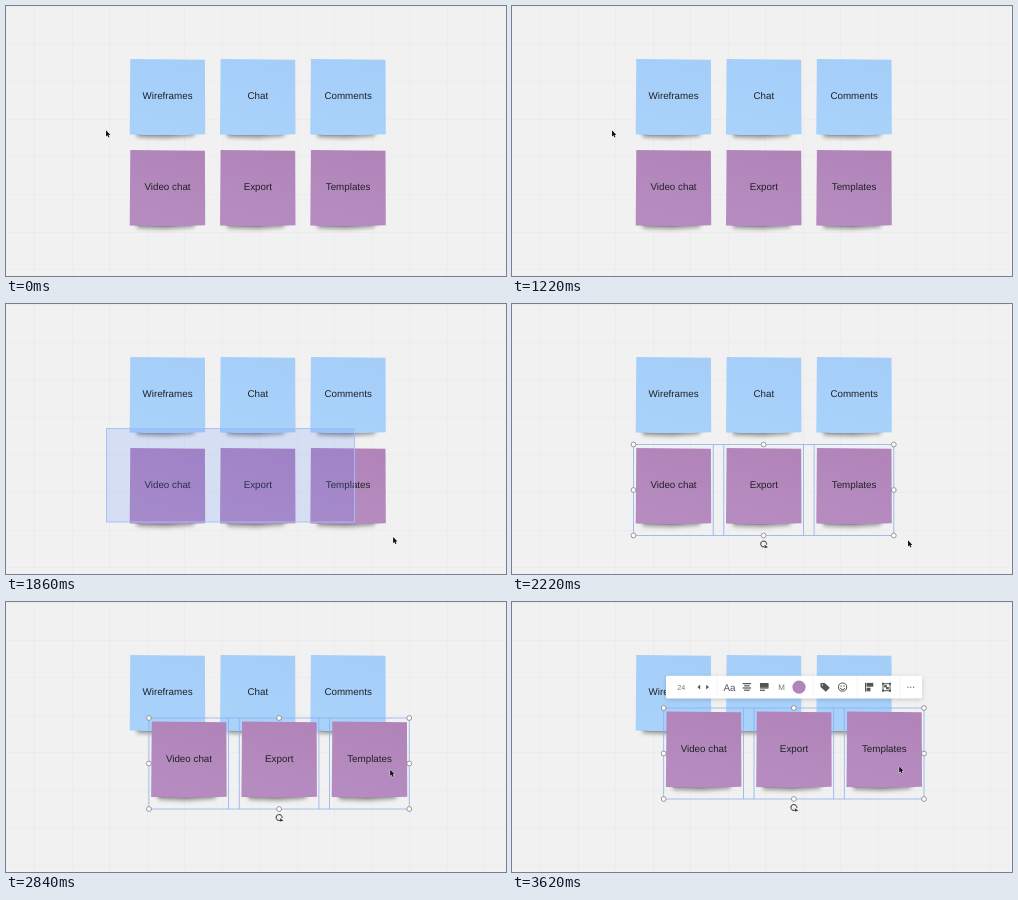
Recreate the animation shown at these times as an HTML page with a canvas. Size 500 by 270 pixels, loop 3.64 s.

```html
<!DOCTYPE html>
<html lang="en">
<head>
<meta charset="utf-8">
<title>Hold shift to select</title>
<style>
html, body { margin: 0; width: 100%; height: 100%; overflow: hidden; background: #f1f1f1; }
canvas { display: block; width: 100vw; height: 100vh; }
</style>
</head>
<body>
<canvas id="stage" width="500" height="270"></canvas>
<script>
const ctx = document.getElementById('stage').getContext('2d');
const LOOP = 3640;
const CARD_IN = 600, CARD_OUT = 1220;
const SWEEP = 1395, LAG = 78, RELEASE = 2060;
const GRAB = 2680, LEAD = 40;
const BAR_IN = 2290, BAR_OUT = 2700, BAR_BACK = 3440;
const FONT = '"Liberation Sans", Arial, sans-serif';
const PITCH = 90.3, NOTE = 75;
const BOX = { left: 121.5, top: 140.5, width: 79.7, height: 91, right: 381.8 };
const ICON = '#555';

function ease(t, from, length) {
  const p = Math.min(1, Math.max(0, (t - from) / length));
  return p * p * (3 - 2 * p);
}

function dragAt(t) {
  const p = ease(t, GRAB, 250);
  return [30.2 * p, -34.5 * p];
}

function cursorAt(t) {
  const out = ease(t, SWEEP, 520);
  const back = ease(t, 2300, 350);
  const [dx, dy] = dragAt(t + LEAD);
  return [100 + 296 * out - 39 * back + dx, 124 + 112 * out - 37.5 * back + dy];
}

function rect(x, y, w, h, color) {
  ctx.fillStyle = color;
  ctx.fillRect(x, y, w, h);
}

function poly(points, fill) {
  ctx.beginPath();
  points.forEach(([x, y]) => ctx.lineTo(x, y));
  ctx.closePath();
  ctx.fillStyle = fill;
  ctx.fill();
}

function arc(x, y, r, from, to, color, width = 1) {
  ctx.beginPath();
  ctx.arc(x, y, r, from, to);
  ctx.strokeStyle = color;
  ctx.lineWidth = width;
  ctx.stroke();
}

function disc(x, y, r, fill) {
  ctx.beginPath();
  ctx.arc(x, y, r, 0, Math.PI * 2);
  ctx.fillStyle = fill;
  ctx.fill();
}

function panel(x, y, w, h, r, fill) {
  ctx.beginPath();
  ctx.roundRect(x, y, w, h, r);
  ctx.fillStyle = fill;
  ctx.fill();
}

function shadow(alpha, blur, dy) {
  ctx.shadowColor = `rgba(0,0,0,${alpha})`;
  ctx.shadowBlur = blur;
  ctx.shadowOffsetY = dy;
}

function text(str, x, y, size, color, weight = 400) {
  ctx.font = `${weight} ${size}px ${FONT}`;
  ctx.textRendering = 'geometricPrecision';
  ctx.textAlign = 'center';
  ctx.fillStyle = color;
  ctx.fillText(str, x, y);
}

function board() {
  rect(0, 0, 500, 270, '#f1f1f1');
  for (let i = 0; i < 13; i++) rect(Math.round(28 + i * 37.5), 0, 1, 270, '#ececec');
  for (let i = 0; i < 8; i++) rect(0, Math.round(i * 37.6), 500, 1, '#ececec');
}

function note(label, top, bottom) {
  ctx.save();
  shadow(0.4, 4, 2);
  poly([[7, 60], [66, 60], [64, 75], [36, 77], [7, 76]], '#888');
  ctx.restore();

  const paint = ctx.createLinearGradient(NOTE, 0, NOTE * 0.7, NOTE);
  paint.addColorStop(0, top);
  paint.addColorStop(1, bottom);
  ctx.beginPath();
  ctx.moveTo(0.4, 0);
  ctx.lineTo(NOTE, 0.8);
  ctx.lineTo(NOTE + 0.3, NOTE + 0.3);
  ctx.quadraticCurveTo(NOTE / 2, NOTE + 2, -0.2, NOTE + 0.7);
  ctx.closePath();
  ctx.fillStyle = paint;
  ctx.fill();
  text(label, NOTE / 2 + 0.1, 40.1, 9.8, '#202127');
}

function row(y, labels, top, bottom) {
  labels.forEach((label, i) => {
    ctx.save();
    ctx.translate(123.9 + i * PITCH, y);
    note(label, top, bottom);
    ctx.restore();
  });
}

function selection() {
  const { left, top, width, height, right } = BOX;
  const middle = (left + right) / 2;
  ctx.strokeStyle = '#8db0ef';
  ctx.lineWidth = 0.8;
  for (let i = 0; i < 3; i++) ctx.strokeRect(left + i * PITCH, top, width, height);
  for (const y of [top, top + height]) {
    for (let i = 0; i < 2; i++) rect(left + width + i * PITCH, y - 0.4, PITCH - width, 0.8, '#8db0ef');
  }
  for (let i = 0; i < 9; i++) {
    if (i === 4) continue;
    const x = left + (i % 3) * (right - left) / 2;
    const y = top + Math.floor(i / 3) * height / 2;
    disc(x, y, 2.4, '#fff');
    arc(x, y, 2.4, 0, Math.PI * 2, '#808080', 0.8);
  }
  arc(middle, 240, 3, 1.3, 6.5, '#333');
  poly([[middle + 1, 240.8], [middle + 4.4, 243.2], [middle + 1, 244]], '#333');
}

function lines(x, y, count, color, short) {
  for (let i = 0; i < count; i++) {
    const w = i % 2 ? short : 8.5;
    rect(x - w / 2, y + i * 2.2, w, 1.2, color);
  }
}

function arrow(x, dir) {
  poly([[x, 117.3], [x, 121.9], [x + dir * 2.8, 119.6]], ICON);
}

function smiley(x, y) {
  arc(x, y, 4.1, 0, Math.PI * 2, ICON);
  arc(x, y + 0.4, 2.2, 0.2, Math.PI - 0.2, ICON);
  for (const side of [-1, 1]) disc(x + side * 1.5, y - 1.1, 0.7, ICON);
}

function frameIcon(x, y) {
  ctx.strokeRect(x - 3.5, y - 3.5, 7, 7);
  for (const a of [-1, 1]) {
    rect(x + a - 1.3, y + a - 1.2, 2.6, 2.4, ICON);
    for (const b of [-1, 1]) rect(x + a * 3.5 - 1, y + b * 3.5 - 1, 2, 2, ICON);
  }
}

function toolbar(alpha) {
  ctx.save();
  ctx.globalAlpha = alpha;
  shadow(0.18, 4, 1);
  panel(123.8, 108.3, 256.2, 22.7, 1.5, '#fff');
  ctx.shadowColor = 'transparent';
  for (const x of [174.5, 270.5, 314.5, 357.5]) rect(x, 109, 0.7, 21.5, '#eee');

  text('24', 139, 122.2, 7.2, '#777');
  arrow(158, -1);
  arrow(164, 1);
  text('Aa', 187.3, 123.1, 9.8, ICON);
  lines(204.7, 115.5, 4, ICON, 5.5);
  lines(222, 115.5, 3, ICON, 8.5);
  rect(217.8, 116, 8.5, 4, ICON);
  rect(217.8, 122.2, 5, 1.2, ICON);
  text('M', 239.3, 122.5, 8, '#777');
  disc(256.8, 119.7, 6.6, '#b184ba');

  poly([[278.3, 115.6], [282.5, 115.6], [287.6, 120.2], [283.6, 124.2], [278.3, 119.6]], ICON);
  disc(280.3, 117.4, 0.7, '#fff');
  smiley(300.4, 119.6);
  rect(322.8, 115.2, 1, 9, ICON);
  rect(324.3, 115.4, 6.8, 3.8, ICON);
  rect(324.3, 120.2, 4, 3.6, ICON);
  frameIcon(344.3, 119.7);
  for (let i = -1; i < 2; i++) disc(368.6 + i * 2.8, 119.8, 0.7, '#777');
  ctx.restore();
}

function marquee(t) {
  const [x, y] = cursorAt(t - LAG);
  if (x <= 100) return;
  rect(100.5, 124.5, x - 100.5, y - 124.5, 'rgba(80,125,255,.17)');
  ctx.strokeStyle = '#a3c0f2';
  ctx.lineWidth = 0.9;
  ctx.strokeRect(100.5, 124.5, x - 100.5, y - 124.5);
}

function pointer(x, y) {
  const tip = new Path2D('M0 0V6.2L1.4 5L2.4 7.2L3.4 6.8L2.5 4.6H4.4Z');
  ctx.save();
  ctx.translate(x, y + 0.3);
  ctx.strokeStyle = 'rgba(255,255,255,.7)';
  ctx.lineWidth = 1;
  ctx.stroke(tip);
  ctx.fillStyle = '#111';
  ctx.fill(tip);
  ctx.restore();
}

function card() {
  rect(0, 0, 500, 270, '#fff');
  panel(203, 98.5, 192, 62.5, 11, '#8e8d8d');
  text('HOLD', 147, 139, 26, '#8e8d8d', 700);
  text('SHIFT', 299, 138.3, 26, '#fbfbf5', 700);
}

function draw(t) {
  if (t >= CARD_IN && t < CARD_OUT) return card();
  board();
  row(52.9, ['Wireframes', 'Chat', 'Comments'], '#a4cef8', '#a8d2fa');
  ctx.save();
  ctx.translate(...dragAt(t));
  row(143.9, ['Video chat', 'Export', 'Templates'], '#b083b9', '#b68cc0');
  if (t >= RELEASE) selection();
  const alpha = ease(t, t < BAR_OUT ? BAR_IN : BAR_BACK, 80);
  if (alpha > 0) toolbar(alpha);
  ctx.restore();
  if (t < RELEASE) marquee(t);
  pointer(...cursorAt(t));
}

const start = performance.now();
function tick() {
  draw((performance.now() - start) % LOOP);
  requestAnimationFrame(tick);
}
tick();
</script>
</body>
</html>
```
